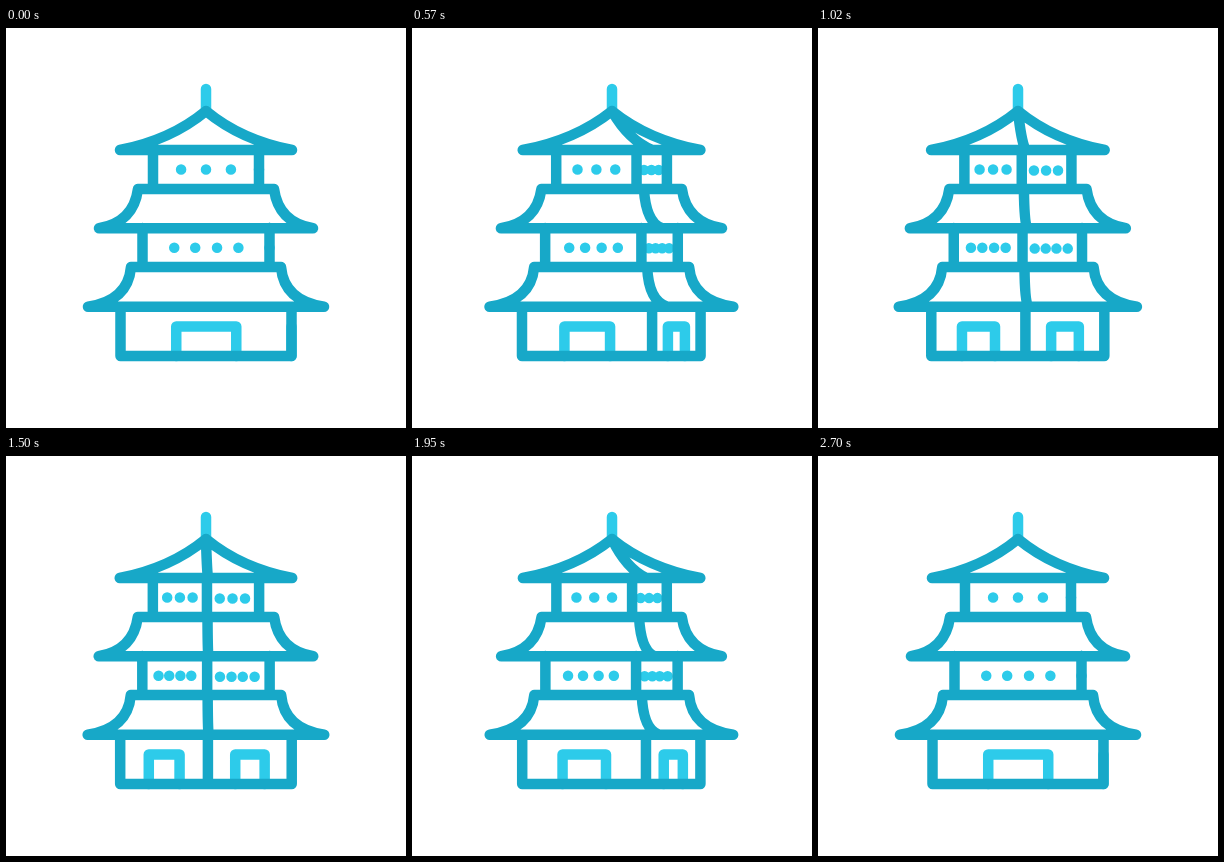
Animation, 400 px wide and 400 px high, one loop 2.73 s. Source, as an HTML page:

```html
<!DOCTYPE html>
<html lang="en">
<head>
<meta charset="utf-8">
<title>Turning pagoda</title>
<style>
  html, body { margin: 0; width: 100%; height: 100%; overflow: hidden; background: #fff; }
  svg { display: block; width: 100%; height: 100%; }
  path { fill: none; stroke-width: 10.5; stroke-linecap: round; stroke-linejoin: round; }
  .light { stroke: #2dcbea; }
  .dark { stroke: #17a8c8; }
</style>
</head>
<body>
<svg viewBox="0 0 400 400">
  <path class="light" d="M200 61V82"/>
  <path class="light" id="doors"/>
  <path class="light" id="dots"/>
  <path class="dark" id="frame"/>
</svg>
<script>
const LOOP = 2730, MID = 200;

// Corner offset from the middle (1 = right edge, 0 = centre): time, value, slope per ms
const TURN = [
  [0, 1, 0], [570, .47, -.0011], [1020, .087, -.0005], [1300, 0, 0],
  [1500, .022, .00025], [1950, .396, .0013], [2220, .76, .0011], [LOOP, 1, 0]
];

// Half widths and heights of each roof, with the bend of its edge
const ROOFS = [
  { top: [0, 83], bend: [35, 112], foot: [86, 122] },
  { top: [68, 161], bend: [72.5, 194.5], foot: [107, 200.3] },
  { top: [75, 239], bend: [78, 273], foot: [118, 278.7] }
];
const STOREYS = [[53, 122, 161], [63.5, 200, 239]];
const BASE = [85.5, 278.7, 328];

// Window positions as fractions of a face
const WINDOWS = [
  { y: 141.5, left: [.265, .5, .735], right: [.245, .49, .73] },
  { y: 219.7, left: [.25, .415, .587, .755], right: [.205, .39, .57, .76] }
];
const DOOR = [.326, .677];

const el = id => document.getElementById(id);
const doors = el('doors'), dots = el('dots'), frame = el('frame');
const mix = (a, b, k) => a + (b - a) * k;
const line = (x0, x1, y) => `M${x0} ${y}H${x1}`;

function cornerAt(t) {
  const i = TURN.findIndex(k => k[0] > t);
  const [t0, a, m] = TURN[i - 1], [t1, b, n] = TURN[i];
  const d = t1 - t0, s = (t - t0) / d, r = 1 - s;
  return r * r * ((1 + 2 * s) * a + s * d * m) + s * s * ((3 - 2 * s) * b - r * d * n);
}

// Maps a half width to x on the left edge, the corner and the right edge
function edges(c, growLeft, growRight) {
  const swell = Math.sin(Math.PI * c);
  return [
    w => MID - w * (1 + growLeft * swell),
    w => MID + w * c,
    w => MID + w * (1 + growRight * swell)
  ];
}

function roof({ top, bend, foot }, sides) {
  const [left, , right] = sides;
  let d = line(left(foot[0]), right(foot[0]), foot[1]);
  if (top[0]) d += line(left(top[0]), right(top[0]), top[1]);
  for (const side of sides) {
    const at = ([w, y]) => `${side(w)} ${y} `;
    d += `M${at(top)}Q${at(bend)}${at(foot)}`;
  }
  return d;
}

const walls = ([w, y0, y1], sides) =>
  sides.map(side => `M${side(w)} ${y0}V${y1}`).join('');

function draw(t) {
  const c = cornerAt(t);
  const eased = c - .03 * Math.sin(2 * Math.PI * c); // upper storeys turn more softly
  const roofSides = edges(c, .038, .028);
  const baseSides = edges(c, .053, .036);
  const storeySides = edges(eased, .053, .036);

  const [l, m, r] = baseSides.map(side => side(BASE[0]));
  const ground = BASE[2];
  frame.setAttribute('d',
    ROOFS.map(s => roof(s, roofSides)).join('') +
    STOREYS.map(s => walls(s, storeySides)).join('') +
    walls(BASE, baseSides) + line(l, r, ground));

  let p = '';
  WINDOWS.forEach(({ y, left, right }, i) => {
    const [a, b, e] = storeySides.map(side => side(STOREYS[i][0]));
    for (const k of left) p += `M${mix(a, b, k)} ${y}h.01`;
    for (const k of right) p += `M${mix(b, e, k)} ${y + 1 - c}h.01`;
  });
  dots.setAttribute('d', p);

  const door = (a, b) =>
    `M${mix(a, b, DOOR[0])} ${ground}V298.5H${mix(a, b, DOOR[1])}V${ground}`;
  doors.setAttribute('d', door(l, m) + door(m, r));
}

function tick() {
  draw(performance.now() % LOOP);
  requestAnimationFrame(tick);
}
tick();
</script>
</body>
</html>
```
